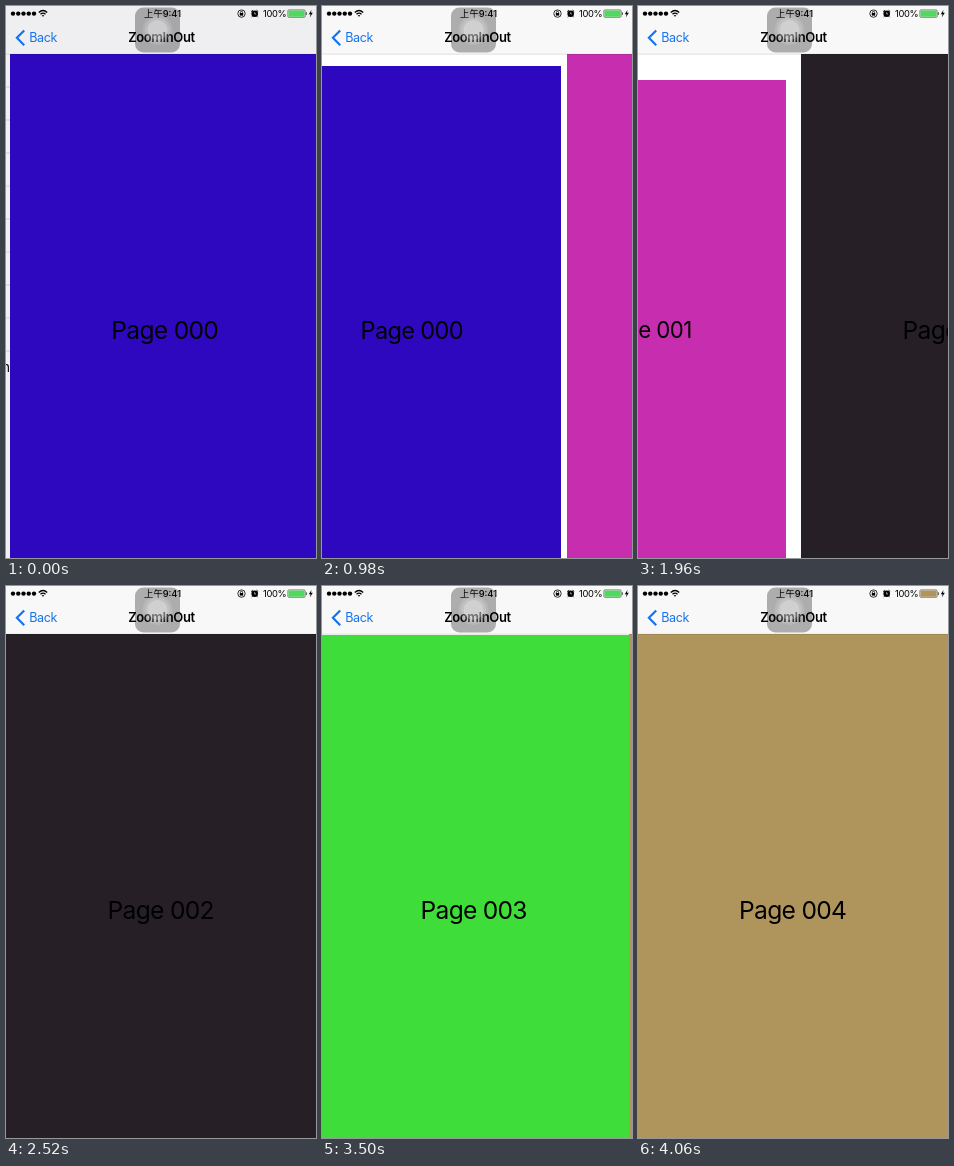
Write an HTML page that moves like this. It is 310 by 552 pixels and loops after 4200 ms.

```html
<!DOCTYPE html>
<html lang="en">
<head>
<meta charset="utf-8">
<title>Zooming pages</title>
<style>
  html, body { margin: 0; width: 100%; height: 100%; overflow: hidden; background: #fff; }
  svg { display: block; width: 100%; height: 100%; }
  text { font-family: Inter, "Noto Sans CJK SC", "Noto Sans CJK", sans-serif; }
  .page rect { shape-rendering: crispEdges; }
  .page text { font-size: 24.6px; letter-spacing: -.7px; text-anchor: middle; }
  .status { font-size: 9.3px; }
  .title { font-size: 13px; font-weight: 600; letter-spacing: -.4px; text-anchor: middle; }
  .back { font-size: 12.6px; letter-spacing: -.45px; fill: #1673ee; }
</style>
</head>
<body>
<svg id="stage" viewBox="0 0 310 552">
  <rect width="310" height="552" fill="#fff"/>
  <g id="list">
    <rect y="48" width="10" height="504" fill="#f1f1f3"/>
    <path id="rules" stroke="#cfcfd3" fill="none"/>
    <text x="4" y="366" font-size="13" text-anchor="end">n</text>
  </g>
  <g id="pages"></g>

  <rect id="bar" width="310" height="48"/>
  <path d="M0 48.2H310" stroke="#000" stroke-opacity=".3" stroke-width=".4"/>

  <g id="dots"></g>
  <path d="M32.8 6.5Q37 2.6 41.2 6.5M34.5 8.3Q37 6 39.5 8.3" fill="none" stroke="#000" stroke-width="1.3"/>
  <path d="M35.7 9.4Q37 8.4 38.3 9.4L37 10.8Z"/>
  <text class="status" x="156.6" y="11" text-anchor="middle" font-weight="500">上午9:41</text>

  <g fill="none" stroke="#000" stroke-width=".8">
    <circle cx="235.5" cy="7.6" r="3.7"/>
    <path d="M234.4 7.2V6.4a1.1 1.1 0 0 1 2.2 0V7.2"/>
  </g>
  <rect x="233.8" y="7" width="3.4" height="2.6"/>
  <circle cx="248.7" cy="7.8" r="3.3"/>
  <path d="M245.2 5.6L246.8 4.2M252.2 5.6L250.6 4.2M246.4 10.4L245.8 11.2M251 10.4L251.6 11.2" stroke="#000"/>
  <path d="M248.7 6.2V8H250" stroke="#fff" stroke-width=".6" fill="none"/>
  <text class="status" x="257" y="11" letter-spacing="-.3">100%</text>
  <rect x="281.9" y="3.9" width="17.2" height="7.4" rx="1" fill="none" stroke="#333" stroke-width=".6"/>
  <rect id="charge" x="282.5" y="4.5" width="16" height="6.2" rx=".6"/>
  <path d="M299.8 6.2h.9v2.8h-.9Z" fill="#333"/>
  <path d="M305.6 3.8L302.8 8.2H304.6L303.8 11.4L306.8 6.8H304.9Z"/>

  <path d="M18.2 24.4L10.9 31.8L18.2 39.2" fill="none" stroke="#1673ee" stroke-width="2.2"/>
  <text class="back" x="23.3" y="36.3">Back</text>
  <text class="title" x="155.4" y="36.3">ZoomInOut</text>

  <g id="knob">
    <rect x="129" y="1.5" width="45" height="45" rx="8.5" fill-opacity=".3"/>
    <g fill="#fff">
      <circle cx="151.5" cy="24" r="15" fill-opacity=".12"/>
      <circle cx="151.5" cy="24" r="12.5" fill-opacity=".15"/>
      <circle cx="151.5" cy="24" r="10" fill-opacity=".25"/>
    </g>
  </g>
</svg>
<script>
  const NS = 'http://www.w3.org/2000/svg';
  const W = 310, H = 552, TOP = 48, MID = TOP + H / 2;
  const LOOP = 4200, STEP = 140, SETTLE = 60;
  const COLORS = ['#2e08bf', '#c62daf', '#262026', '#3edd3a', '#af955c'];
  const SWIPES = [
    { start: 708, drag: 535 },
    { start: 1786, drag: 200 },
    { start: 2763, drag: 200 },
    { start: 3474, drag: 200 }
  ];
  const $ = id => document.getElementById(id);

  function add(parent, tag, attrs, text = '') {
    const el = document.createElementNS(NS, tag);
    for (const key in attrs) el.setAttribute(key, attrs[key]);
    el.textContent = text;
    parent.appendChild(el);
    return el;
  }

  for (let i = 0; i < 5; i++) add($('dots'), 'circle', { cx: 7 + i * 5.25, cy: 7.6, r: 2.2 });

  $('rules').setAttribute('d', Array.from({ length: 9 }, (_, i) => `M0 ${81 + i * 33}H10`).join(''));

  // Each page is drawn around its own centre.
  const pages = COLORS.map((fill, i) => {
    const g = add($('pages'), 'g', { class: 'page' });
    add(g, 'rect', { x: -W / 2, y: -H / 2, width: W, height: H, fill });
    add(g, 'text', { x: -.3, y: 9 }, 'Page ' + String(i).padStart(3, '0'));
    return g;
  });

  // Accelerating drag, then an exponential settle at matching speed.
  function swipe(t, { start, drag }) {
    const u = t - start;
    if (u <= 0) return 0;
    const reach = drag / (drag + 2 * SETTLE);
    if (u < drag) return reach * (u / drag) ** 2;
    return 1 - (1 - reach) * Math.exp((drag - u) / SETTLE);
  }

  function draw(time) {
    const t = Math.floor((time % LOOP) / STEP) * STEP;
    const pushing = t < 280;
    const push = pushing ? Math.round(4 * Math.exp(-t / 100)) : 0;
    const travel = SWIPES.reduce((sum, s) => sum + swipe(t, s), 0);
    const scroll = Math.round(travel * W) / W; // whole pixels

    pages.forEach((page, i) => {
      const gone = scroll - i;
      page.style.display = Math.abs(gone) < 1 ? '' : 'none';
      const scale = 1 - .2 * Math.max(0, gone);
      const x = W / 2 - gone * W + push;
      page.setAttribute('transform', `translate(${x} ${MID}) scale(${scale})`);
    });

    $('list').style.display = pushing ? '' : 'none';
    $('bar').setAttribute('fill', t < STEP ? '#efeff1' : '#f8f8f9');
    $('charge').setAttribute('fill', scroll > 3.95 ? '#af945b' : '#4fd95f');
  }

  function tick(now) {
    draw(now);
    requestAnimationFrame(tick);
  }
  draw(0);
  requestAnimationFrame(tick);
</script>
</body>
</html>
```
